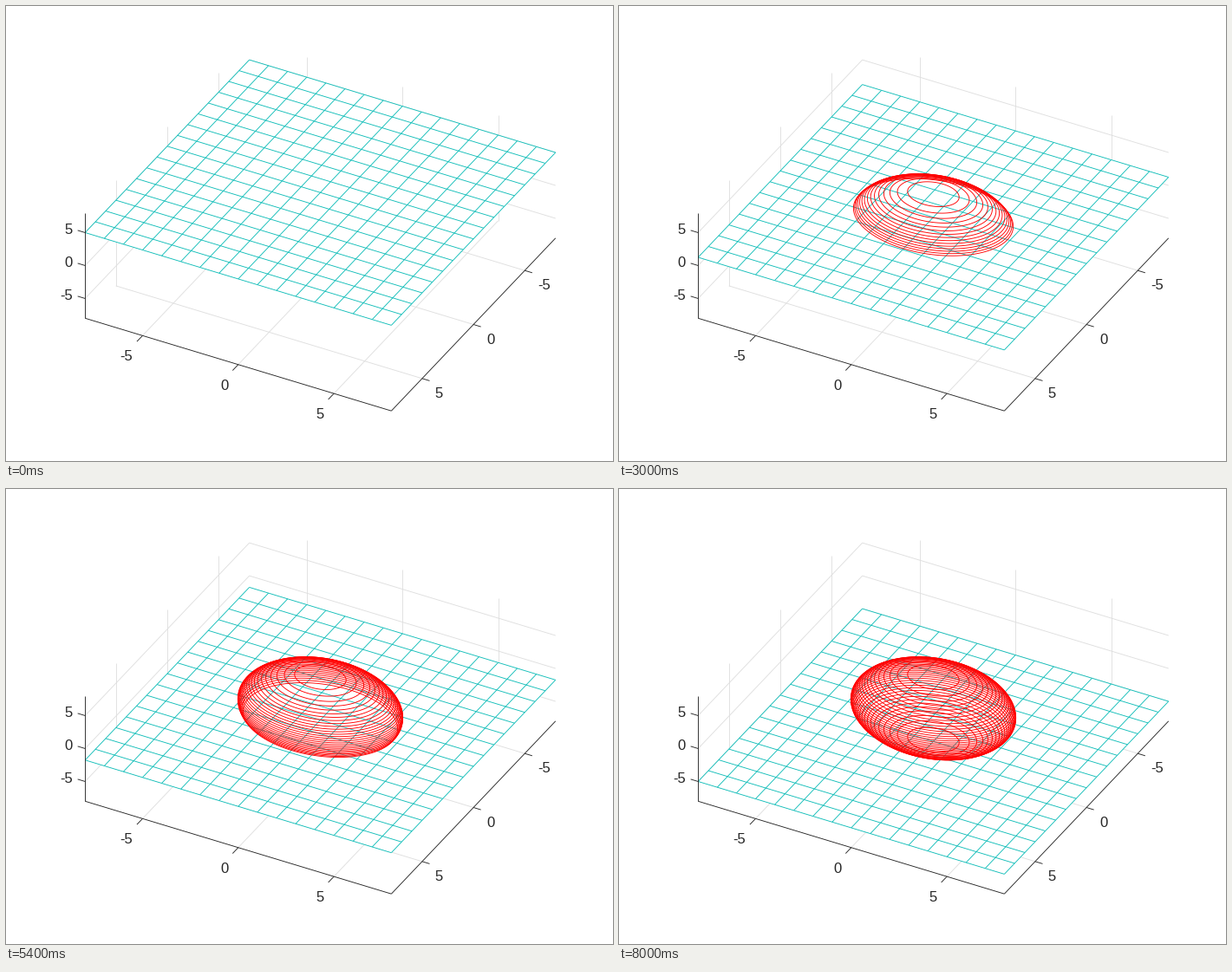
A matplotlib script that plays this animation: 700 px wide and 525 px high, repeating every 8200 ms.

```python
import numpy as np
import matplotlib.pyplot as plt
from matplotlib.animation import FuncAnimation
from matplotlib.collections import LineCollection
from matplotlib.patches import Polygon

W, H, DPI = 700, 525, 100
PX = 72 / DPI                      # points per pixel
LIM = 8                            # the box spans -8..8 on every axis
TICKS = (-5, 0, 5)
HEIGHTS = np.linspace(5, -5, 41)   # height of the cutting plane
SEMI_U, SEMI_V, SEMI_W = 4, 3, 5   # ellipsoid semi-axes

INK, GRID, MESH, RING = "#262626", "#dfdfdf", "#12beb9", "#ff0000"
LINE = 0.9 * PX

# Orthographic view: screen vectors of one unit along u, v and w
ORIGIN = np.array([362.5, 253.25])
U = np.array([22.07, 6.681])
V = np.array([-11.835, 12.46])
Z = np.array([0, -7.6])


def project(u, v, w):
    u, v, w = np.broadcast_arrays(u, v, w)
    return ORIGIN + u[..., None] * U + v[..., None] * V + w[..., None] * Z


fig = plt.figure(figsize=(W / DPI, H / DPI), dpi=DPI, facecolor="white")
ax = fig.add_axes([0, 0, 1, 1])
ax.set_xlim(0, W)
ax.set_ylim(H, 0)
ax.axis("off")


def stroke(points, color, zorder):
    x, y = np.transpose(points)
    ax.plot(x, y, color=color, lw=LINE, zorder=zorder, solid_capstyle="butt")


def edge(a, b, color=GRID, zorder=1):
    stroke([project(*a), project(*b)], color, zorder)


def tick(at, step, offset, value, ha):
    base = project(*at)
    stroke([base, base + step], INK, 5)
    x, y = base + offset
    ax.text(x, y + 5.8, str(value), ha=ha, va="baseline", color=INK,
            family="Liberation Sans", size=16.67 * PX, zorder=5)


def draw_box():
    lo, hi = -LIM, LIM
    for t in TICKS:
        # floor
        edge((t, lo, lo), (t, hi, lo))
        edge((lo, t, lo), (hi, t, lo))
        # left wall
        edge((lo, t, lo), (lo, t, hi))
        edge((lo, lo, t), (lo, hi, t))
        # back wall
        edge((t, lo, lo), (t, lo, hi))
        edge((lo, lo, t), (hi, lo, t))

        tick((t, hi, lo), (-6.5, 6.8), (-11.3, 23.2), t, "right")
        tick((hi, t, lo), (8.6, 2.6), (14.9, 16.5), t, "left")
        tick((lo, hi, t), (-8.6, -2.6), (-14.7, -3.8), t, "right")

    edge((lo, hi, lo), (hi, hi, lo), INK, 5)
    edge((hi, hi, lo), (hi, lo, lo), INK, 5)
    edge((lo, hi, lo), (lo, hi, hi), INK, 5)


def plane_lines(w):
    ends = np.array([-LIM, LIM])
    for k in range(-LIM, LIM + 1):
        yield project(k, ends, w)
        yield project(ends, k, w)


def ring(w):
    r = np.sqrt(max(0, 1 - (w / SEMI_W) ** 2))
    a = np.linspace(0, 2 * np.pi, 121)
    return project(SEMI_U * r * np.cos(a), SEMI_V * r * np.sin(a), w)


draw_box()
corners = np.array([[-1, -1], [1, -1], [1, 1], [-1, 1]]) * LIM
sheet = Polygon(project(*corners.T, HEIGHTS[0]), fc="white", ec="none", zorder=2)
ax.add_patch(sheet)
mesh = LineCollection([], colors=MESH, linewidths=LINE, zorder=3)
slices = LineCollection([], colors=RING, linewidths=LINE, zorder=4)
ax.add_collection(mesh, autolim=False)
ax.add_collection(slices, autolim=False)

# The first and last cuts only touch the poles
rings = [ring(w) for w in HEIGHTS[1:-1]]


def update(i):
    w = HEIGHTS[i]
    sheet.set_xy(project(*corners.T, w))
    mesh.set_segments(list(plane_lines(w)))
    slices.set_segments(rings[:i])
    return sheet, mesh, slices


anim = FuncAnimation(fig, update, frames=len(HEIGHTS), interval=200,
                     repeat=True, repeat_delay=0, blit=False)
plt.show()
```
